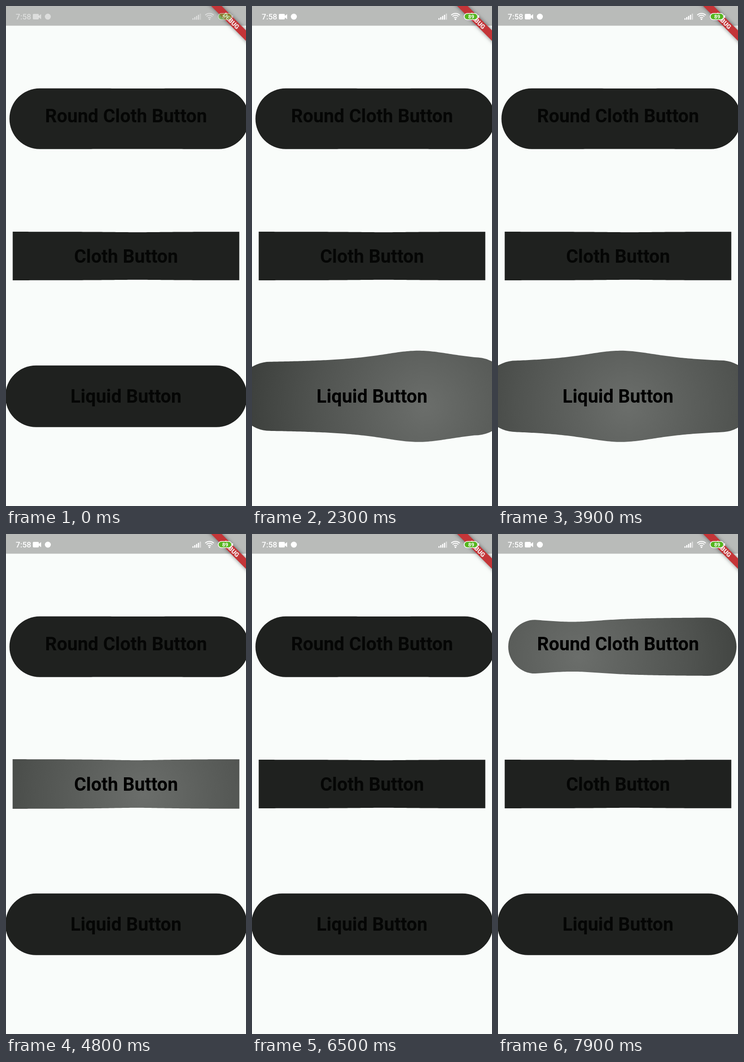
An HTML page with a canvas that plays this animation: 519 by 1079 pixels, repeating every 8 s.

```html
<!DOCTYPE html>
<html lang="en">
<head>
<meta charset="utf-8">
<title>Elastic buttons</title>
<style>
  html, body { margin: 0; width: 100%; height: 100%; overflow: hidden; background: #f9fcfa; }
  canvas { display: block; }
</style>
</head>
<body>
<canvas id="stage" width="519" height="1079"></canvas>
<script>
const ctx = document.getElementById('stage').getContext('2d');
const W = 519, H = 1079, LOOP = 8000, STEP = 100;

// half: half height; edge / bump / spread: how a press deforms the outline;
// grow: sideways growth; touch: [time, x] stops of the finger
const buttons = [
  { label: 'Round Cloth Button', y: 243.2, baseline: 251, left: 73, right: 460, half: 65.7, round: true,
    edge: -2, bump: -10, spread: 95, grow: -7, rest: 0.04,
    down: 6700, up: 9000, touch: [[6700, 340], [7900, 160]] },
  { label: 'Cloth Button', y: 539.5, baseline: 554, left: 14.5, right: 504.5, half: 51.3, round: false,
    edge: 10, bump: -10, spread: 80, grow: 1.5, rest: 0.12,
    down: 4700, up: 6150, touch: [[4700, 282], [5400, 293], [6150, 460]] },
  { label: 'Liquid Button', y: 842.3, baseline: 856, left: 65, right: 455, half: 66.5, round: true,
    edge: 5, bump: 27, spread: 115, grow: 26, rest: 0,
    down: 1700, up: 4400, touch: [[1700, 120], [2500, 401], [3300, 100], [4400, 390]] }
];

const clamp = v => Math.max(0, Math.min(1, v));
const smooth = v => { v = clamp(v); return v * v * (3 - 2 * v); };

function touchX(stops, t) {
  let x = stops[0][1];
  for (let i = 1; i < stops.length; i++) {
    const [t0, x0] = stops[i - 1], [t1, x1] = stops[i];
    if (t >= t0) x = x0 + (x1 - x0) * (1 - Math.cos(Math.PI * clamp((t - t0) / (t1 - t0)))) / 2;
  }
  return x;
}

function drawButton(b, t) {
  const pressed = t >= b.down && t < b.up;
  const press = smooth((t - b.down) / 450) * (1 - smooth((t - b.up) / 250));
  const amount = b.rest + (1 - b.rest) * press;
  const x = t < b.down || t > b.up + 250 ? 285 : touchX(b.touch, t);
  const left = b.left - b.grow * press, right = b.right + b.grow * press;
  const halfAt = px => b.half + amount * (b.edge + b.bump / (1 + ((px - x) / b.spread) ** 2));

  ctx.beginPath();
  for (let px = left; px < right; px += 4) ctx.lineTo(px, b.y - halfAt(px));
  ctx.lineTo(right, b.y - halfAt(right));
  if (b.round) ctx.arc(right, b.y, halfAt(right), -Math.PI / 2, Math.PI / 2);
  for (let px = right; px > left; px -= 4) ctx.lineTo(px, b.y + halfAt(px));
  ctx.lineTo(left, b.y + halfAt(left));
  if (b.round) ctx.arc(left, b.y, halfAt(left), Math.PI / 2, Math.PI * 1.5);
  ctx.closePath();

  ctx.fillStyle = '#1f211f';
  if (pressed) {
    const glow = ctx.createRadialGradient(x + 15, b.y + 22, 0, x + 15, b.y + 22, 400);
    glow.addColorStop(0, '#6b6e6b');
    glow.addColorStop(0.6, '#505350');
    glow.addColorStop(1, '#3b3e3b');
    ctx.fillStyle = glow;
  }
  ctx.fill();

  if (!b.round && pressed && press > 0.9) {
    const top = b.y - halfAt(left);
    ctx.fillStyle = '#3b3e3b';
    polygon([[left - 10, top - 3], [left + 2, top], [left, top + 2]]);
  }
  text(b.label, 259.5, b.baseline, 'bold 40px', pressed ? '#000' : '#050605');
}

function polygon(points) {
  ctx.beginPath();
  points.forEach(([x, y]) => ctx.lineTo(x, y));
  ctx.fill();
}

function pill(x, y, w, h, r) {
  ctx.beginPath();
  ctx.roundRect(x, y, w, h, r);
}

function text(string, x, y, font, color, align = 'center') {
  ctx.font = font + ' Roboto, sans-serif';
  ctx.textAlign = align;
  ctx.fillStyle = color;
  ctx.fillText(string, x, y);
}

function drawBanner() {
  ctx.save();
  ctx.translate(W - 32, 32);
  ctx.rotate(Math.PI / 4);
  ctx.shadowColor = 'rgba(0,0,0,.5)';
  ctx.shadowBlur = 8;
  ctx.fillStyle = '#c43538';
  ctx.fillRect(-80, -8, 160, 16);
  ctx.shadowBlur = 0;
  text('DEBUG', 0, 5, '900 13.5px', '#f6eeee');
  ctx.restore();
}

function drawStatusIcons(alpha) {
  ctx.save();
  ctx.globalAlpha = alpha;
  text('7:58', 21, 29, '500 17px', '#fff', 'left');

  pill(58, 17, 13, 12, 2);
  ctx.fill();
  polygon([[70, 22], [76, 17.5], [76, 28.5], [70, 24]]);
  ctx.beginPath();
  ctx.arc(90.5, 23, 6.5, 0, 7);
  ctx.fill();

  for (let i = 0; i < 5; i++) {
    ctx.globalAlpha = alpha * (i === 4 ? 0.5 : 1);
    const h = 3 + i * 2.5;
    ctx.fillRect(403 + i * 4, 29.5 - h, 2.6, h);
  }
  ctx.globalAlpha = alpha;

  ctx.strokeStyle = '#fff';
  ctx.lineWidth = 2;
  for (const r of [4.5, 9, 13]) {
    ctx.beginPath();
    ctx.arc(440, 29, r, -Math.PI * 0.75, -Math.PI * 0.25);
    ctx.stroke();
  }
  ctx.beginPath();
  ctx.arc(440, 28.5, 1.8, 0, 7);
  ctx.fill();

  pill(459, 16, 29, 13.5, 6.7);
  ctx.fillStyle = '#55b51f';
  ctx.fill();
  ctx.lineWidth = 1.6;
  ctx.stroke();
  ctx.fillStyle = '#fff';
  ctx.fillRect(489, 20, 2, 6);
  text('89', 474, 27, 'bold 11.5px', '#fff');
  ctx.restore();
}

function draw(now) {
  const t = Math.floor(now % LOOP / STEP) * STEP;
  ctx.fillStyle = '#f9fcfa';
  ctx.fillRect(0, 0, W, H);
  buttons.forEach(b => drawButton(b, t));
  ctx.fillStyle = '#b9bbb9';
  ctx.fillRect(0, 0, W, 42.5);
  drawBanner();
  drawStatusIcons(t < 400 ? 0.5 : 1);
  requestAnimationFrame(draw);
}
requestAnimationFrame(draw);
</script>
</body>
</html>
```
